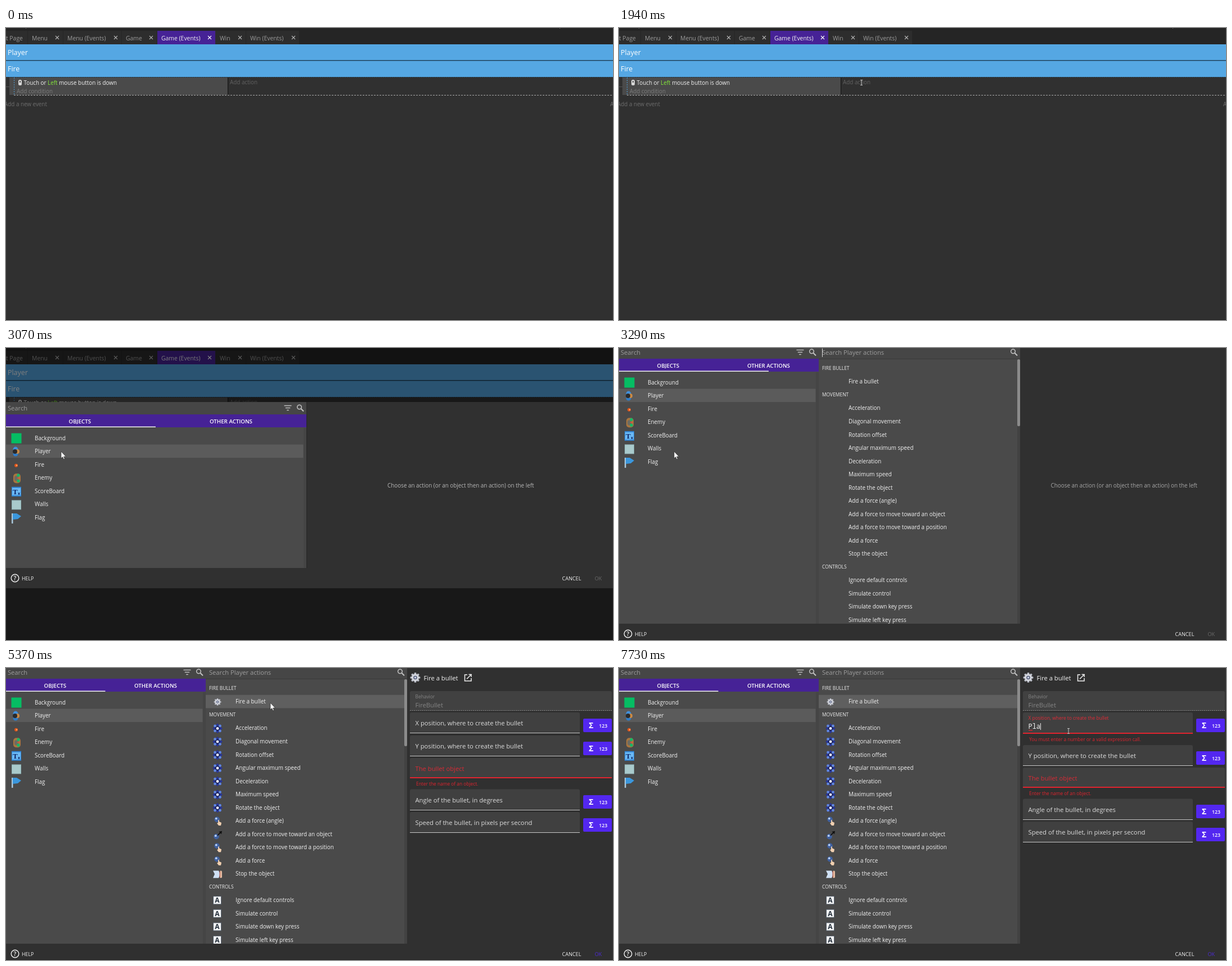
An HTML page with a canvas for the animation above (8000 ms loop, 1079 px wide and 519 px high).

```html
<!DOCTYPE html>
<html lang="en">
<head>
<meta charset="utf-8">
<title>Adding an action</title>
<style>
  html, body { margin: 0; width: 100%; height: 100%; overflow: hidden; background: #303030; }
  canvas { display: block; }
</style>
</head>
<body>
<canvas width="1079" height="519"></canvas>
<script>
const ctx = document.querySelector('canvas').getContext('2d');
const LOOP = 8000;
const SANS = '"Open Sans", "Noto Sans", sans-serif';
const MONO = '"Noto Sans Mono", "DejaVu Sans Mono", monospace';
const BODY = 9.87, FIELD = 11.22, SMALL = 8.4;
const PURPLE = '#462296', ACCENT = '#5327f0', RED = '#e0242f', PANEL = '#4a4a4a', PAGE = '#303030';

const OPEN = 1950, PICK_OBJECT = 3290, PICK_ACTION = 5040, FOCUS = 6070, ERROR = 6510;

const TABS = [
  ['t Page', 0, 38, 0], ['Menu', 46, 101, 91], ['Menu (Events)', 109, 205, 195], ['Game', 213, 268, 258],
  ['Game (Events)', 276, 372, 362], ['Win', 380, 426, 416], ['Win (Events)', 434, 521, 511]
];
const OBJECTS = ['Background', 'Player', 'Fire', 'Enemy', 'ScoreBoard', 'Walls', 'Flag'];
const ACTIONS = [
  ['FIRE BULLET'], ['Fire a bullet', gear], ['MOVEMENT'],
  ...['Acceleration', 'Diagonal movement', 'Rotation offset', 'Angular maximum speed', 'Deceleration',
    'Maximum speed', 'Rotate the object'].map(name => [name, flower]),
  ['Add a force (angle)', hand], ['Add a force to move toward an object', push],
  ['Add a force to move toward a position', hand], ['Add a force', hand], ['Stop the object', stop],
  ['CONTROLS'],
  ...['Ignore default controls', 'Simulate control', 'Simulate down key press', 'Simulate left key press']
    .map(name => [name, letterKey])
];
// Pointer path: time, x, y
const PATH = [
  [310, 957, 487], [1090, 460, 98], [1130, 460, 98], [1280, 431, 97], [2050, 431, 97], [2570, 117, 186],
  [2600, 117, 186], [3070, 98, 184], [3400, 98, 184], [4080, 452, 58], [4240, 452, 58], [4800, 463, 62],
  [5040, 463, 62], [5300, 470, 62], [5400, 470, 62], [5830, 797, 104], [5880, 797, 104], [6000, 799, 112]
];

const clamp = v => Math.max(0, Math.min(1, v));
const progress = (t, start, length) => clamp((t - start) / length);
const ease = p => p * p * (3 - 2 * p);
const mix = (a, b, p) => a + (b - a) * p;
const mixColor = (a, b, p) => `rgb(${a.map((v, i) => Math.round(mix(v, b[i], p))).join()})`;

function rect(x, y, w, h, color) {
  ctx.fillStyle = color;
  ctx.fillRect(x, y, w, h);
}
function round(x, y, w, h, radii, color) {
  ctx.fillStyle = color;
  ctx.beginPath();
  ctx.roundRect(x, y, w, h, radii);
  ctx.fill();
}
function dot(x, y, r, color) {
  ctx.fillStyle = color;
  ctx.beginPath();
  ctx.arc(x, y, r, 0, 7);
  ctx.fill();
}
function ring(x, y, r, color, width) {
  ctx.strokeStyle = color;
  ctx.lineWidth = width;
  ctx.beginPath();
  ctx.arc(x, y, r, 0, 7);
  ctx.stroke();
}
function shape(points, color) {
  ctx.fillStyle = color;
  ctx.beginPath();
  points.forEach(([x, y]) => ctx.lineTo(x, y));
  ctx.closePath();
  ctx.fill();
}
function line(x1, y1, x2, y2, color, width = 1, dash = []) {
  ctx.strokeStyle = color;
  ctx.lineWidth = width;
  ctx.setLineDash(dash);
  ctx.beginPath();
  ctx.moveTo(x1, y1);
  ctx.lineTo(x2, y2);
  ctx.stroke();
  ctx.setLineDash([]);
}
// y is the middle of the capitals
function text(string, x, y, color = '#f2f2f2', size = BODY, weight = 400, family = SANS) {
  ctx.font = `${weight} ${size}px ${family}`;
  ctx.fillStyle = color;
  ctx.fillText(string, x, y + size * 0.36);
  return x + ctx.measureText(string).width;
}

function cross(x, y, color) {
  line(x - 3, y - 3, x + 3, y + 3, color, 1.1);
  line(x + 3, y - 3, x - 3, y + 3, color, 1.1);
}
function magnifier(x, y) {
  ring(x - 1.5, y - 2, 3.8, '#c4c4c4', 1.5);
  line(x + 1.5, y + 1, x + 6, y + 5.5, '#c4c4c4', 1.9);
}
function filter(x, y) {
  [6.5, 4.2, 1.8].forEach((half, i) => line(x - half, y - 4.5 + i * 4, x + half, y - 4.5 + i * 4, '#c4c4c4', 1.4));
}
function gear(x, y, scale = 1) {
  for (let i = 0; i < 8; i++) {
    const a = i * Math.PI / 4;
    dot(x + Math.cos(a) * 5 * scale, y + Math.sin(a) * 5 * scale, 1.5 * scale, '#b9bcc6');
  }
  dot(x, y, 4.6 * scale, '#d5d7de');
  dot(x, y, 2.4 * scale, '#59617c');
  dot(x, y, 1.2 * scale, '#cfd6ec');
}
function flower(x, y) {
  dot(x, y, 5, '#1c2460');
  for (let i = 0; i < 8; i++) {
    const a = i * Math.PI / 4;
    const diagonal = i % 2;
    dot(x + Math.cos(a) * 6.3, y + Math.sin(a) * 6.3, diagonal ? 2.4 : 2, diagonal ? '#5f86e6' : '#27349a');
  }
  dot(x, y, 2.4, '#f4f6ff');
}
function ball(x, y) {
  dot(x, y, 4.8, '#3f609f');
  dot(x - 1.3, y - 1.5, 1.9, '#b9d0f2');
}
function hand(x, y) {
  ball(x - 1, y - 3);
  shape([[x + 1, y - 2], [x + 2.5, y - 2], [x + 3, y + 1], [x + 7, y + 3], [x + 6, y + 8], [x + 2, y + 8], [x - 1, y + 4], [x + 1, y + 3]], '#f0cfb0');
}
function push(x, y) {
  ball(x - 2, y + 4);
  line(x, y + 2, x + 6, y - 4, '#111', 1.8);
  shape([[x + 8, y - 6], [x + 2.5, y - 5], [x + 7, y - 0.5]], '#111');
}
function stop(x, y) {
  shape([[x - 8, y - 6], [x + 2, y - 6], [x + 5, y], [x + 2, y + 7], [x - 8, y + 7], [x - 5, y]], '#cfe0f4');
  round(x + 4, y - 6, 4, 13, 2, '#e2b9a0');
  line(x + 4, y - 5, x + 4, y + 6, '#a33d35', 1);
}
function letterKey(x, y) {
  rect(x - 8, y - 8, 15, 15, '#56606c');
  rect(x - 7, y - 7, 13, 13, '#f4f5f6');
  text('A', x - 4.8, y - 0.5, '#26303c', 12, 700);
}

const objectIcons = [
  (x, y) => rect(x - 8.5, y - 9, 18, 18, '#05bd63'),
  (x, y) => {
    dot(x - 1, y - 4, 4.5, '#3f8fdc');
    dot(x - 1, y + 4, 4.5, '#2f7cc8');
    dot(x + 2, y, 4, '#c98a45');
    dot(x - 2, y, 4, '#2a2a2c');
  },
  (x, y) => { dot(x, y + 1, 3, '#e0561c'); dot(x + 1, y + 1, 1.2, '#ffb070'); },
  (x, y) => {
    round(x - 5, y - 8, 13, 17, 5, '#a9753f');
    round(x - 3, y - 4, 7, 9, 3, '#6d6b62');
    dot(x + 4, y - 5, 2.6, '#15b968');
    dot(x + 4, y + 5, 2.6, '#15b968');
    rect(x + 2, y - 1, 5, 2, '#d05b3c');
  },
  (x, y) => {
    rect(x - 8, y - 8, 17, 17, '#2f86d8');
    rect(x - 7, y - 6, 15, 13, '#6bb9f4');
    text('T', x - 6, y + 1, '#0a2266', 13, 700, '"Liberation Serif", serif');
    text('x', x + 3, y + 4, '#0a2266', 7, 700);
  },
  (x, y) => { rect(x - 8, y - 8, 17, 17, '#8fb3b6'); rect(x - 7, y - 7, 15, 15, '#a9cacc'); },
  (x, y) => {
    rect(x - 8, y - 8, 2.5, 18, '#a9c8dc');
    shape([[x - 6, y - 8], [x + 1, y - 8], [x + 9, y - 3], [x + 3, y + 2], [x - 6, y + 3]], '#3b97dd');
  }
];

function drawPage() {
  rect(0, 0, 1079, 519, PAGE);
  rect(0, 0, 1079, 29, '#252525');
  rect(0, 5, 521, 24, '#2d2d2d');
  rect(35, 0, 1, 1, '#777');
  rect(984, 0, 1, 1, '#777');
  for (const [name, x, end, close] of TABS) {
    const active = name === 'Game (Events)';
    if (active) rect(269, 5, 103, 24, PURPLE);
    else rect(end, 5, 1, 24, '#262626');
    text(name, x, 18, active ? '#f4f4f4' : '#9c9c9c', 10.4);
    if (close) cross(close, 17, active ? '#fff' : '#b4b4b4');
  }
  rect(0, 29, 1079, 58, '#55a7e3');
  rect(0, 57, 1079, 1.4, '#1d3c55');
  text('Player', 3, 44, '#fff', 12.4);
  text('Fire', 3, 73, '#fff', 12.4);

  rect(6, 88, 388, 31, PANEL);
  rect(394, 88, 1, 31, '#111');
  line(0, 104.5, 6, 104.5, '#555');
  line(14.5, 88, 14.5, 119, '#4f9bd2', 1, [2, 2]);
  line(6, 87.5, 1079, 87.5, '#24435a', 1, [2, 2]);
  line(14, 119.5, 1079, 119.5, '#a8a8a8', 1, [3, 2]);
  round(22, 92, 6, 10, 2.5, '#d8d8d8');
  rect(24, 94, 2, 3, '#555');
  let x = text('Touch or ', 31.5, 97);
  x = text('Left', x, 97, '#84e73a');
  text(' mouse button is down', x, 97);
  text('Add condition', 19, 112, '#7c7c7c');
  text('Add action', 398, 96, '#626262');
  text('Add a new event', -3, 135, '#6e6e6e');
  text('A', 1074, 135, '#6e6e6e');
  rect(0, 518, 1079, 1, '#222');
}

function drawObjects(t, top, width, bottom, selected) {
  rect(0, top, width, bottom - top, PANEL);
  rect(0, top, width, 22, '#464646');
  text('Search', 3, top + 11, '#9d9d9d', 11.15);
  if (t >= 2100 && t < 2600) rect(3, top + 4, 1, 14, '#ddd');
  filter(width - 33, top + 11);
  magnifier(width - 11, top + 11);
  rect(0, top + 22, width, 23, PURPLE);
  ctx.textAlign = 'center';
  text('OBJECTS', mix(0, width, 0.246), top + 34, '#fff', 9.75, 600);
  text('OTHER ACTIONS', mix(0, width, 0.749), top + 34, '#fff', 9.75, 600);
  ctx.textAlign = 'left';
  const underline = mix(266, 176.5, ease(progress(t, PICK_OBJECT + 20, 300)));
  rect(0, top + 43.5, underline, 1.5, '#f2f2f2');
  rect(width - 5, top + 46, 5, bottom - top - 46, '#454545');
  OBJECTS.forEach((name, i) => {
    const y = top + 64 + i * 23.57;
    if (i === selected) rect(0, y - 12, width - 5.5, 23.5, '#5b5b5b');
    objectIcons[i](18, y + 0.5);
    text(name, 51, y);
  });
}

function drawActions(t, pointer) {
  rect(355, 0, 358, 490, PANEL);
  rect(355, 0, 358, 19, '#464646');
  rect(355, 19, 358, 1, '#3a3a3a');
  text('Search Player actions', 361, 8, '#9d9d9d', 11.15);
  magnifier(702, 8);
  if (t < 3790 || (t >= 4300 && t < 4800)) rect(361, 1, 1, 15, '#ddd');
  rect(708, 20, 5, 470, '#424242');
  round(708, 20, 5, 119, 2, '#8b8b8b');
  ctx.save();
  ctx.beginPath();
  ctx.rect(355, 20, 353, 470);
  ctx.clip();
  ACTIONS.forEach(([name, icon], i) => {
    const y = 36.3 + i * 23.53;
    if (!icon) return text(name, 361, y, '#ececec', 8.45);
    const hovered = pointer.x > 355 && Math.abs(pointer.y - y) < 11.8;
    if (t < PICK_ACTION ? hovered : i === 1) rect(355, y - 12, 353, 23.5, '#5f5f5f');
    if (t >= 3400) icon(376, y + 0.5);
    text(name, 408, y);
  });
  ctx.restore();
}

function field(label, top, width, color = '#dcdcdc') {
  round(718, top, width, 36, [3, 3, 0, 0], '#404040');
  if (label) text(label, 727.5, top + 19, color, FIELD);
}
function expressionButton(top) {
  const y = Math.floor(top) + 11;
  round(1026, y, 51, 24, 2, ACCENT);
  text('Σ', 1036, y + 11.5, '#fff', 14, 700);
  text('123', 1054, y + 12.5, '#fff', 8.8, 600);
}
function expressionField(label, top) {
  field(label, top, 302);
  rect(718, Math.round(top + 36), 302, 1, '#c8c8c8');
  expressionButton(top);
}

function drawFocusedField(t) {
  const top = 79;
  const focus = ease(progress(t, FOCUS, 200));
  const failed = t >= ERROR;
  expressionField('', top);
  const accent = [80, 44, 226];
  const color = failed
    ? mixColor(accent, [224, 42, 54], progress(t, ERROR, 190))
    : mixColor([220, 220, 220], accent, focus);
  text('X position, where to create the bullet', 727.5, mix(98, 89, focus), color, mix(FIELD, SMALL, focus));
  if (t >= FOCUS) {
    const grow = failed ? 1 : focus;
    rect(869 - 151 * grow, top + 36, 302 * grow, 2, failed ? RED : ACCENT);
    const typed = 'Pla'.slice(0, (t >= 7430) + (t >= 7630) + (t >= 7730));
    const end = text(typed, 727.5, 104, '#f0f0f0', 11.9, 400, MONO);
    if (typed) rect(728, 110, 7, 1.3, RED);
    if (t < 6600 || t >= 7130) rect(end, 98, 1, 12, '#eee');
  }
  if (failed) text('You must enter a number or a valid expression call.', 729, 127, RED, 8.35);
}

function drawParameters(t) {
  gear(727.5, 17, 1.4);
  text('Fire a bullet', 742.5, 18, '#f4f4f4', FIELD);
  ctx.strokeStyle = '#f0f0f0';
  ctx.lineWidth = 1.5;
  ctx.beginPath();
  [[820, 12], [815.5, 12], [815.5, 23], [827, 23], [827, 18]].forEach(p => ctx.lineTo(...p));
  ctx.stroke();
  line(819, 19.5, 827, 11.5, '#f0f0f0', 1.5);
  line(822.5, 11.5, 827.7, 11.5, '#f0f0f0', 1.5);
  line(827, 11, 827, 16, '#f0f0f0', 1.5);

  round(718, 41, 359, 35, [3, 3, 0, 0], '#414141');
  line(718, 75.5, 1077, 75.5, '#8a8a8a', 1, [2, 1.5]);
  text('Behavior', 727.5, 51, '#858585', SMALL);
  text('FireBullet', 727.5, 66, '#858585', FIELD);

  drawFocusedField(t);
  const shift = t >= ERROR ? 17 : 0;
  expressionField('Y position, where to create the bullet', 120 + shift);
  field('The bullet object', 160 + shift, 359, '#d92a35');
  rect(718, 194 + shift, 359, 2, RED);
  text('Enter the name of an object.', 729, 206 + shift, RED, 8.35);
  expressionField('Angle of the bullet, in degrees', 215.5 + shift);
  expressionField('Speed of the bullet, in pixels per second', 256 + shift);
}

function drawFooter(t, y) {
  ring(16, y, 6.8, '#f0f0f0', 1.4);
  text('?', 13.4, y, '#f0f0f0', 10.5, 600);
  text('HELP', 28, y + 0.5, '#f0f0f0', 8.8);
  text('CANCEL', 988.5, y + 0.5, '#f0f0f0', 9.1);
  text('OK', 1046.5, y + 0.5, t >= PICK_ACTION ? '#4d2bd6' : '#6a6a6a', 9.1);
}

function drawDialog(t, pointer) {
  const hint = 'Choose an action (or an object then an action) on the left';
  if (t < PICK_OBJECT) {
    const shown = ease(progress(t, OPEN, 225));
    ctx.globalAlpha = shown;
    rect(0, 0, 1079, 519, 'rgba(0, 0, 0, .5)');
    rect(0, 96, 1079, 331, PAGE);
    const row = Math.floor((pointer.y - 148) / 23.57);
    drawObjects(t, 96, 534, 391, pointer.x < 528 ? row : -1);
    rect(534, 96, 1, 295, '#262626');
    text(hint, 678, 244, '#b6b6b6');
    drawFooter(t, 409);
    ctx.globalAlpha = 1;
    return;
  }
  rect(0, 0, 1079, 519, PAGE);
  drawObjects(t, -3, 355, 490, 1);
  drawActions(t, pointer);
  if (t < PICK_ACTION) text(hint, 767.5, 244, '#a6a6a6');
  else drawParameters(t);
  drawFooter(t, 508);
  rect(0, 518, 1079, 1, '#242424');
}

function pointerAt(t) {
  let i = 0;
  while (i < PATH.length - 1 && PATH[i + 1][0] <= t) i++;
  const [start, x, y] = PATH[i];
  const [end, nextX, nextY] = PATH[i + 1] || [start + 1, x, y];
  const p = ease(progress(t, start, end - start));
  return { x: mix(x, nextX, p), y: mix(y, nextY, p) };
}

function drawPointer(t, { x, y }) {
  if (t < PATH[0][0]) return;
  const overText = (t >= 1200 && t < 2050) || (t > PICK_ACTION && x > 718 && y > 79);
  if (overText) {
    const color = '#c4c4c4';
    line(x, y - 4.5, x, y + 4.5, color, 1);
    line(x - 2, y - 4.5, x + 2, y - 4.5, color, 1);
    line(x - 2, y + 4.5, x + 2, y + 4.5, color, 1);
    return;
  }
  const outline = [[0, 0], [0, 12], [2.7, 9.6], [4.5, 13.8], [6.3, 13], [4.6, 9], [8.4, 8.9]];
  shape(outline.map(([dx, dy]) => [x + dx, y + dy]), '#fff');
  ctx.strokeStyle = '#222';
  ctx.lineWidth = 0.6;
  ctx.stroke();
}

function frame(now) {
  const t = now % LOOP;
  const pointer = pointerAt(t);
  if (t < PICK_OBJECT) drawPage();
  if (t >= OPEN) drawDialog(t, pointer);
  drawPointer(t, pointer);
  requestAnimationFrame(frame);
}
requestAnimationFrame(frame);
</script>
</body>
</html>
```
